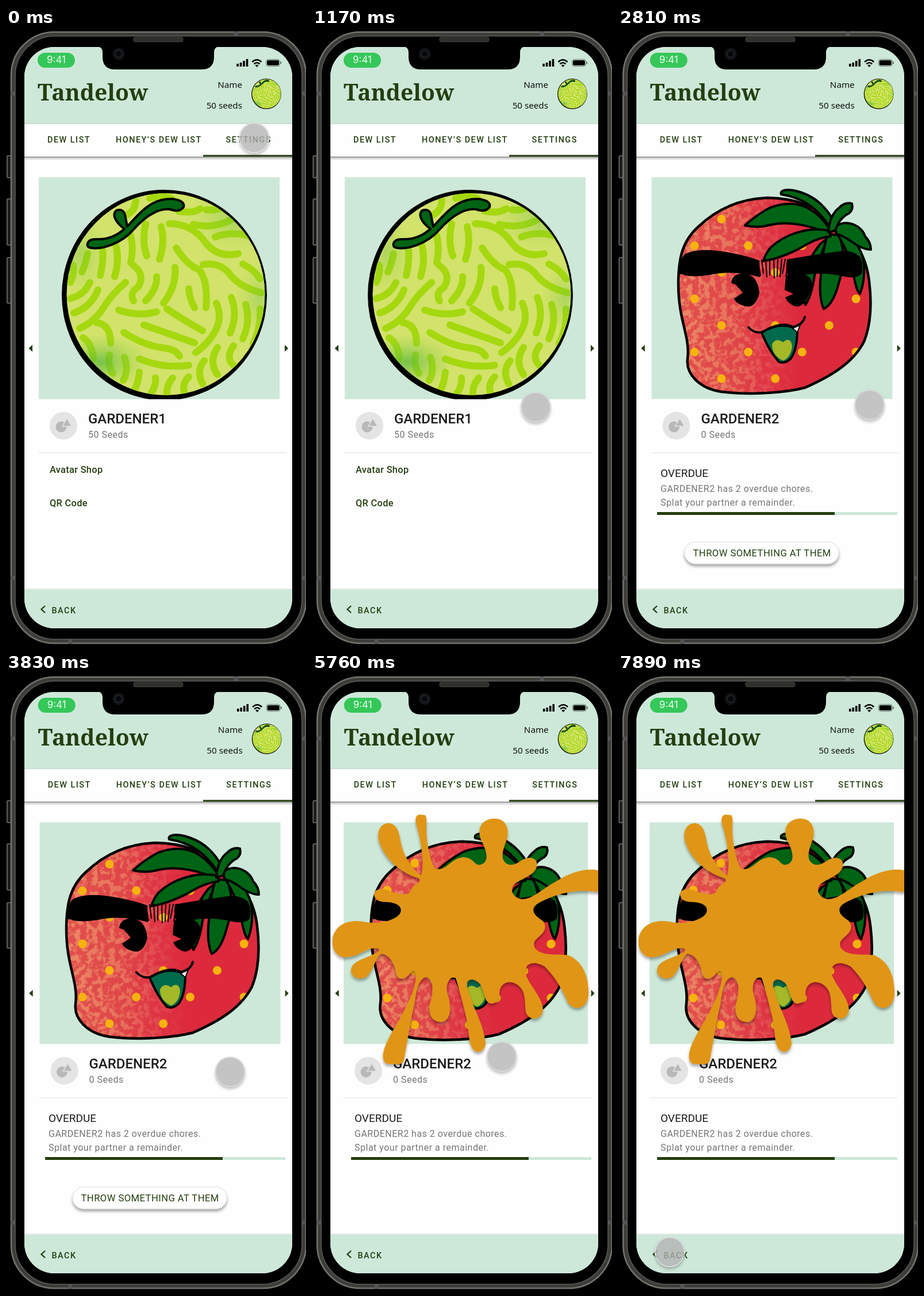
Write an HTML page that moves like this. It is 522 px wide and 1072 px high and loops after 8 s.

```html
<!DOCTYPE html>
<html lang="en">
<head>
<meta charset="utf-8">
<title>Avatar settings</title>
<style>
  html, body { margin: 0; width: 100%; height: 100%; overflow: hidden; background: #000; }
  svg { position: absolute; left: 0; top: 0; }
  text { font-family: Roboto, sans-serif; font-size: 16px; fill: #243e10; }
  .tab { font-size: 14.4px; font-weight: 500; letter-spacing: 1.5px; }
  .brand { font: 600 39px "Noto Serif", serif; }
  .user { font: 15.2px "Noto Sans", sans-serif; fill: #111; }
  .name { font-size: 24px; font-weight: 500; fill: #1d1b1b; }
  .note { fill: #757575; letter-spacing: .5px; }
  .item { font-size: 16.4px; font-weight: 500; letter-spacing: .3px; }
  .mint { fill: #cde8d9; }
  .dark { fill: #243e10; }
  .leaf { fill: #006414; stroke: #000; stroke-width: 4; stroke-linejoin: round; }
  .stripes { fill: none; stroke: #a5d80f; stroke-width: 12; stroke-linecap: round; }
  #cursor {
    position: absolute; left: -26px; top: -26px; width: 50px; height: 50px;
    border: 1px solid #f4f4f4; border-radius: 50%; background: #c4c4c4;
    box-shadow: 0 0 0 .5px #bbb, 0 4px 5px rgba(0,0,0,.24); will-change: transform;
  }
  #cursor.pressed { background: rgba(178,178,178,.78); }
</style>
</head>
<body>
<svg width="522" height="1072" viewBox="0 0 522 1072">
  <defs>
    <clipPath id="screen"><rect x="32" y="33" width="466" height="1010" rx="52"/></clipPath>
    <clipPath id="rind"><ellipse cx="278" cy="462.5" rx="172.5" ry="175.5"/></clipPath>
    <clipPath id="panel"><rect x="50" y="250" width="440" height="395"/></clipPath>
    <path id="body" d="M105 445C105 400 112 370 140 345C175 312 215 296 262 295C310 296 345 310 370 335C410 360 432 395 437 440C442 480 440 515 428 545C410 580 375 603 325 625C290 634 230 638 180 632C140 626 118 600 121 575C126 535 105 510 105 445Z"/>
    <clipPath id="skin"><use href="#body"/></clipPath>
    <radialGradient id="moss"><stop stop-color="#4fb53c" stop-opacity=".7"/><stop offset="1" stop-color="#8acb3a" stop-opacity="0"/></radialGradient>
    <linearGradient id="blush"><stop stop-color="#ec8a66"/><stop offset=".3" stop-color="#e8795f" stop-opacity=".85"/><stop offset=".62" stop-color="#e8586a" stop-opacity="0"/></linearGradient>
    <filter id="speckle">
      <feTurbulence type="fractalNoise" baseFrequency=".1" numOctaves="4" seed="4"/>
      <feColorMatrix values="0 0 0 0 0 0 0 0 0 0 0 0 0 0 0 7 0 0 0 -3.2"/>
      <feComposite in="SourceGraphic" operator="in"/>
    </filter>
    <filter id="drop" x="-10%" y="-10%" width="120%" height="140%"><feDropShadow dx="0" dy="4" stdDeviation="2.5" flood-opacity=".35"/></filter>

    <g id="melon">
      <ellipse cx="275.5" cy="464" rx="178.5" ry="183"/>
      <g clip-path="url(#rind)">
        <rect x="97" y="280" width="360" height="365" fill="#d2e26b"/>
        <path class="stripes" d="M168 385Q170 405 164 430M191 377Q198 402 189 432M216 358Q223 380 217 408M243 340Q236 370 245 396M270 345Q277 372 267 402M142 392Q138 412 132 424M117 412Q119 428 112 442M112 470Q136 464 146 442M118 495Q148 485 160 455M128 522Q156 510 172 482Q185 462 208 442M221 412Q243 428 230 450Q214 460 222 474M262 432Q264 452 243 474M294 416Q297 448 274 478M318 453Q319 470 328 486"/>
        <path class="stripes" d="M296 382Q315 412 336 420Q352 440 348 486M284 340Q325 340 348 374Q370 400 404 392M326 341Q362 350 394 332M364 363Q395 352 424 362M300 318Q325 323 338 314M348 316Q370 318 388 306M343 411Q370 406 388 426Q405 450 445 460M412 410Q432 420 442 436M210 325Q225 318 226 300M250 296Q275 288 290 298M196 490Q230 502 262 493M280 488Q310 508 342 526M240 516Q285 532 328 547M205 529Q240 552 275 556Q295 558 302 570"/>
        <path class="stripes" d="M366 478Q378 505 362 530Q352 548 330 564M392 468Q404 498 390 530M417 480Q426 510 412 540M442 488Q444 520 430 548M232 575Q275 592 318 586M158 512Q182 515 182 548M134 538Q150 548 152 575M180 568Q176 585 186 600M206 572Q214 595 204 612M232 598Q230 618 222 632M260 608Q262 622 250 638M290 608Q278 622 280 640M318 606Q306 618 310 632M345 578Q330 595 342 618M368 555Q352 580 368 602M396 552Q380 574 398 588"/>
        <ellipse cx="165" cy="580" rx="80" ry="48" fill="url(#moss)"/>
        <ellipse cx="400" cy="330" rx="80" ry="55" fill="url(#moss)" opacity=".5"/>
        <ellipse cx="440" cy="470" rx="40" ry="60" fill="url(#moss)" opacity=".4"/>
        <ellipse cx="130" cy="390" rx="45" ry="70" fill="url(#moss)" opacity=".4"/>
      </g>
      <path class="leaf" d="M142 374Q145 366 158 367Q185 368 206 349C190 337 184 324 192 317Q206 312 208 330L211 345C235 318 255 295 290 297Q312 300 309 311Q302 321 285 315C262 313 240 330 222 350C200 376 165 385 148 382Q140 381 142 374Z"/>
    </g>

    <g id="berry">
      <use href="#body" fill="#dc2a3c"/>
      <g clip-path="url(#skin)">
        <rect x="100" y="285" width="345" height="355" fill="url(#blush)" opacity=".4"/>
        <rect x="100" y="285" width="345" height="355" fill="url(#blush)" filter="url(#speckle)"/>
        <g id="seeds" fill="#f6b30c"></g>
      </g>
      <use href="#body" fill="none" stroke="#000" stroke-width="4.5"/>
      <path d="M352 375C325 410 314 440 326 481Q337 465 342 430Q350 400 365 365Z" class="leaf"/>
      <path d="M365 358C355 390 355 410 352 440Q350 470 358 488Q375 480 385 440C395 410 395 390 385 360Z" class="leaf"/>
      <path d="M380 355C395 380 405 400 412 440Q416 458 421 462Q430 440 428 410C425 380 405 360 385 350Z" class="leaf"/>
      <path d="M378 345C400 330 425 345 430 362Q440 372 440 385Q425 385 405 370Q390 360 380 358Z" class="leaf"/>
      <path d="M368 345C345 310 320 295 284 289C281 283 290 280 305 282C345 290 365 315 378 340Z" class="leaf"/>
      <path d="M370 352C340 305 305 298 265 312Q240 325 221 343Q245 348 265 342C300 334 340 345 368 358Z" class="leaf"/>
      <path d="M368 352C330 345 290 358 265 382Q255 395 253 405C285 400 310 387 330 375Q350 364 370 362Z" class="leaf"/>
      <path d="M366 355Q368 325 385 312Q395 302 407 305Q410 315 402 322Q385 330 378 352Z" class="leaf"/>
      <path d="M108 428Q106 400 118 392Q140 382 180 388Q220 394 246 404L247 433Q200 420 160 429Q125 434 112 428ZM294 402Q340 394 385 388Q405 385 420 396Q428 408 424 427Q415 436 395 432Q340 420 300 436Q290 425 294 402Z"/>
      <path d="M197 443Q198 428 217 426Q243 428 246 460Q240 485 225 484Q205 480 202 470L217 460L205 446ZM292 430Q336 420 338 445Q328 485 310 484Q296 480 291 468L305 462L290 455Z"/>
      <path d="M243 403l5 28M250 402l3 25M257 401l2 32M264 400v30M271 402l1 33M278 402l-1 30M285 401l-3 32M291 401l-5 26M297 402l-5 30" stroke="#000" stroke-width="2"/>
      <path d="M250 529Q285 508 312 524Q312 560 300 575Q290 584 280 580Q262 560 250 529Z" fill="#006a4c" stroke="#000" stroke-width="4"/>
      <path d="M287 546Q300 535 303 552Q302 570 288 578Q268 570 268 550Q274 537 287 546Z" fill="#a5b827"/>
      <path d="M302 520L318 513L312 529Z" fill="#fff" stroke="#000" stroke-width="2"/>
      <path d="M227 520Q238 532 252 528Q285 508 305 520Q322 515 325 502" fill="none" stroke="#000" stroke-width="4" stroke-linecap="round"/>
    </g>

    <g id="badge">
      <circle cx="100" cy="691" r="24" fill="#e4e4e4"/>
      <circle cx="96" cy="693" r="9.5" fill="#b8b8b8"/>
      <path d="M106 678L114 692H98Z" fill="#b8b8b8" stroke="#e4e4e4" stroke-width="1.5"/>
      <path d="M57 738H488" stroke="#e9e9e9" stroke-width="1.5"/>
    </g>
  </defs>

  <!-- phone body -->
  <rect width="522" height="1072"/>
  <g fill="#1c1c1b" stroke="#777773" stroke-width="1.5">
    <rect x="2" y="222" width="8" height="38" rx="1"/>
    <rect x="2" y="297" width="8" height="80" rx="1"/>
    <rect x="2" y="399" width="8" height="79" rx="1"/>
  </g>
  <rect x="9" y="7" width="513" height="1062" rx="75" fill="#3d3d3a" stroke="#74746f" stroke-width="2.5"/>
  <path d="M8 114h8M8 955h8M514 114h8M514 955h8M112 1062v8M400 6v8" stroke="#555" stroke-width="7"/>
  <rect x="16" y="14" width="499" height="1048" rx="69" stroke="#5a5a56" stroke-width="1.5"/>
  <rect x="222" y="16" width="86" height="8" rx="3" fill="#302f2e" stroke="#454543"/>

  <g clip-path="url(#screen)">
    <rect x="32" y="33" width="466" height="1010" fill="#fefefe"/>
    <rect class="mint" x="32" y="33" width="466" height="132"/>
    <path d="M32 166H498" stroke="#bccfc5" stroke-width="1.5"/>
    <path d="M32 224.5H498" stroke="#8a8a8a" stroke-width="2"/>
    <path d="M32 227H498" stroke="#d9d9d9" stroke-width="3"/>
    <rect class="dark" x="343" y="220.5" width="155" height="3"/>

    <g id="top">
      <rect x="55" y="43" width="65" height="26" rx="13" fill="#35c759"/>
      <text x="87.5" y="61" text-anchor="middle" style="font:17px Inter,sans-serif;fill:#f1fff4">9:41</text>
      <path d="M403 62v5M408.5 60v7M414 57v10M419.5 54v13" stroke="#000" stroke-width="3.6"/>
      <path d="M428.5 59Q436.5 51.5 444.5 59M431.5 62.5Q436.5 58 441.5 62.5" fill="none" stroke="#000" stroke-width="2.6"/>
      <path d="M433.5 65Q436.5 62.5 439.5 65L436.5 68Z"/>
      <rect x="452.5" y="54.5" width="24" height="12" rx="4" fill="none" stroke="#64766c"/>
      <rect x="454" y="56" width="21" height="9" rx="2.5"/>
      <path d="M478 58.5q2 2 0 4Z" stroke="#64766c"/>
      <text class="brand" x="55" y="126">Tandelow</text>
      <text class="user" x="411" y="104" text-anchor="end">Name</text>
      <text class="user" x="411" y="140" text-anchor="end">50 seeds</text>
      <use href="#melon" transform="translate(413 47.3) scale(.145)"/>
      <text class="tab" x="72" y="199">DEW LIST</text>
      <text class="tab" x="191" y="199">HONEY’S DEW LIST</text>
      <text class="tab" x="382.5" y="199">SETTINGS</text>
      <path class="dark" d="M39.5 556.5l6.5-6v12ZM491 556.5l-6-6v12Z"/>
    </g>

    <g id="own">
      <rect class="mint" x="57" y="259.5" width="419" height="385.5"/>
      <g clip-path="url(#panel)"><use href="#melon"/></g>
      <use href="#badge"/>
      <text class="name" x="143" y="687">GARDENER1</text>
      <text class="note" x="143" y="712">50 Seeds</text>
      <text class="item" x="76" y="773">Avatar Shop</text>
      <text class="item" x="76" y="830.5">QR Code</text>
    </g>

    <g id="partner">
      <rect id="backdrop" class="mint" y="259.5" height="385"/>
      <g clip-path="url(#panel)"><use id="fruit" href="#berry"/></g>
      <g id="profile">
        <use href="#badge"/>
        <text class="name" x="143" y="687">GARDENER2</text>
        <text class="note" x="143" y="712">0 Seeds</text>
      </g>
      <text x="74" y="780" style="font-size:19px;fill:#1d1b1b">OVERDUE</text>
      <text class="note" x="74" y="806">GARDENER2 has 2 overdue chores.</text>
      <text class="note" x="74" y="830">Splat your partner a remainder.</text>
      <rect class="mint" x="68" y="841" width="418" height="5"/>
      <rect class="dark" x="68" y="841" width="309" height="5"/>
      <g id="button">
        <rect x="116" y="893" width="268" height="38" rx="19" fill="#fff" stroke="#dedede" filter="url(#drop)"/>
        <text x="130.5" y="917.5" style="font-size:16.6px;letter-spacing:.45px">THROW SOMETHING AT THEM</text>
      </g>
      <path id="splat" fill="#e09516" filter="url(#drop)"/>
    </g>

    <rect x="32" y="974" width="466" height="2" fill="#e3eae6"/>
    <rect class="mint" x="32" y="976" width="466" height="67"/>
    <path d="M68 1004L61.5 1010L68 1016" fill="none" stroke="#243e10" stroke-width="2.3"/>
    <text class="tab" x="79.5" y="1017">BACK</text>
    <path d="M159 32Q168 33 168 43V50Q168 72 190 72H340Q362 72 362 50V43Q362 33 371 32Z"/>
  </g>
  <circle cx="196" cy="45" r="10.5" fill="#111214"/>
  <circle cx="196" cy="45" r="6" fill="#07080a" stroke="#1d2026" stroke-width="2"/>
</svg>
<div id="cursor"></div>

<script>
const $ = id => document.getElementById(id);
const LOOP = 8000, SWIPE = 1850, SPLAT = 5080;

// Seeds sit on a staggered grid
for (let row = 0; row < 7; row++)
  for (let col = 0; col < 4; col++) {
    const x = (row % 2 ? 133 : 180) + col * 93.7, y = 332 + row * 46.2;
    $("seeds").innerHTML += `<circle cx="${x}" cy="${y}" r="7.5"/>`;
  }

// Splat outline, clockwise from the upper left
const upperArms = "M185 356C160 350 125 325 116 290C112 268 125 260 135 261C152 264 152 285 156 300" +
  "C162 325 180 345 190 352C196 330 190 290 181 262Q178 247 187 246L197 247Q200 250 199 265C198 290 205 325 214 340" +
  "C235 345 240 322 264 320C285 322 282 338 296 332C310 325 302 305 294 290C285 265 300 253 318 253" +
  "C338 253 345 272 338 292C330 312 328 325 340 332C355 338 362 322 378 321Q394 322 391 337" +
  "C386 352 368 355 352 367C343 378 350 390 365 393C385 393 400 375 425 362C450 345 480 338 500 343V381" +
  "C470 375 440 380 415 390C395 398 380 405 387 418C395 430 408 428 405 445C400 460 380 462 388 478";
const drips = "C400 492 420 488 445 490C470 500 482 525 481 560C478 585 455 588 445 572C435 550 425 530 405 510" +
  "C385 498 370 505 371 520C375 540 400 560 402 585C400 605 375 605 372 588C370 565 372 550 355 540" +
  "C340 532 325 540 326 560Q322 576 310 574C298 570 302 550 290 538C278 528 268 532 270 545" +
  "C278 580 300 610 302 645Q298 660 286 658C272 652 274 630 270 605C262 570 255 545 250 530" +
  "C240 525 232 540 235 555C242 575 244 600 228 606C208 608 202 592 205 575C212 555 212 535 200 528" +
  "C185 530 182 550 178 575C170 610 166 640 160 672Q158 680 148 680L130 679";
const leftArms = "Q122 675 124 660C130 630 165 590 178 545C185 520 178 512 172 520C162 535 148 535 146 520" +
  "C142 500 132 488 120 488C110 495 108 515 95 528Q75 537 68 520C66 500 90 498 110 487C122 482 118 478 108 478" +
  "C90 480 80 494 55 494C38 490 34 475 36 460C42 435 65 428 90 432C115 438 145 430 153 418C160 405 145 398 130 398" +
  "Q108 398 108 383Q112 372 130 377C150 385 168 388 172 378C176 365 195 365 185 356Z";
$("splat").setAttribute("d", upperArms + drips + leftArms);

// Pointer path: time, x, y
const path = [
  [0, 432, 191], [180, 432, 191], [500, 464, 430], [700, 436, 570], [900, 318, 715],
  [1170, 389, 659], [1500, 479, 557], [1650, 481, 557], [2000, 481, 557],
  [2250, 495, 590], [2500, 470, 635], [2850, 434, 657], [3200, 405, 682], [3550, 390, 693],
  [3830, 390, 693], [4050, 448, 618], [4300, 270, 800], [4530, 113, 932], [4720, 150, 980],
  [4940, 202, 915], [5380, 205, 913], [5760, 330, 667], [5920, 332, 635], [6280, 260, 618],
  [6550, 178, 710], [6800, 120, 910], [7090, 92, 996], [7200, 90, 1005], [8000, 90, 1006]
];
const presses = [[0, 180], [1650, 2050], [4850, 5380], [7120, LOOP]];

const slope = (i, k) => {
  const a = path[i - 1], b = path[i], c = path[i + 1];
  if (!a || !c || Math.abs(b[k] - a[k]) < 4 || Math.abs(c[k] - b[k]) < 4) return 0;
  return (c[k] - a[k]) / (c[0] - a[0]);
};

// Cubic Hermite curve through the path points
function pointAt(t) {
  const i = path.findIndex((p, n) => n === path.length - 2 || t < path[n + 1][0]);
  const a = path[i], b = path[i + 1], d = b[0] - a[0], u = (t - a[0]) / d, v = 1 - u;
  return [1, 2].map(k =>
    v * v * (1 + 2 * u) * a[k] + u * u * (1 + 2 * v) * b[k] +
    d * u * v * (v * slope(i, k) - u * slope(i + 1, k)));
}

let shown;
function showScreen(n) {
  if (n === shown) return;
  shown = n;
  const show = (id, on) => $(id).style.display = on ? "" : "none";
  const place = (id, value) => $(id).setAttribute("transform", value);
  show("own", n === 0);
  show("partner", n > 0);
  show("button", n === 1);
  show("splat", n === 2);
  place("top", n ? "translate(.7 0)" : "");
  place("profile", n === 2 ? "translate(-2 0)" : "translate(1.5 0)");
  place("fruit", n === 2 ? "translate(-3.9 -6.3) scale(1.014)" : "");
  $("backdrop").setAttribute("x", n === 2 ? 55 : 58.5);
  $("backdrop").setAttribute("width", n === 2 ? 425 : 419);
}

const start = performance.now();
function draw() {
  const t = (performance.now() - start) % LOOP;
  showScreen(t < SWIPE ? 0 : t < SPLAT ? 1 : 2);
  const [x, y] = pointAt(t);
  $("cursor").style.transform = `translate(${x}px, ${y}px)`;
  $("cursor").classList.toggle("pressed", presses.some(([a, b]) => t >= a && t < b));
  requestAnimationFrame(draw);
}
draw();
</script>
</body>
</html>
```
